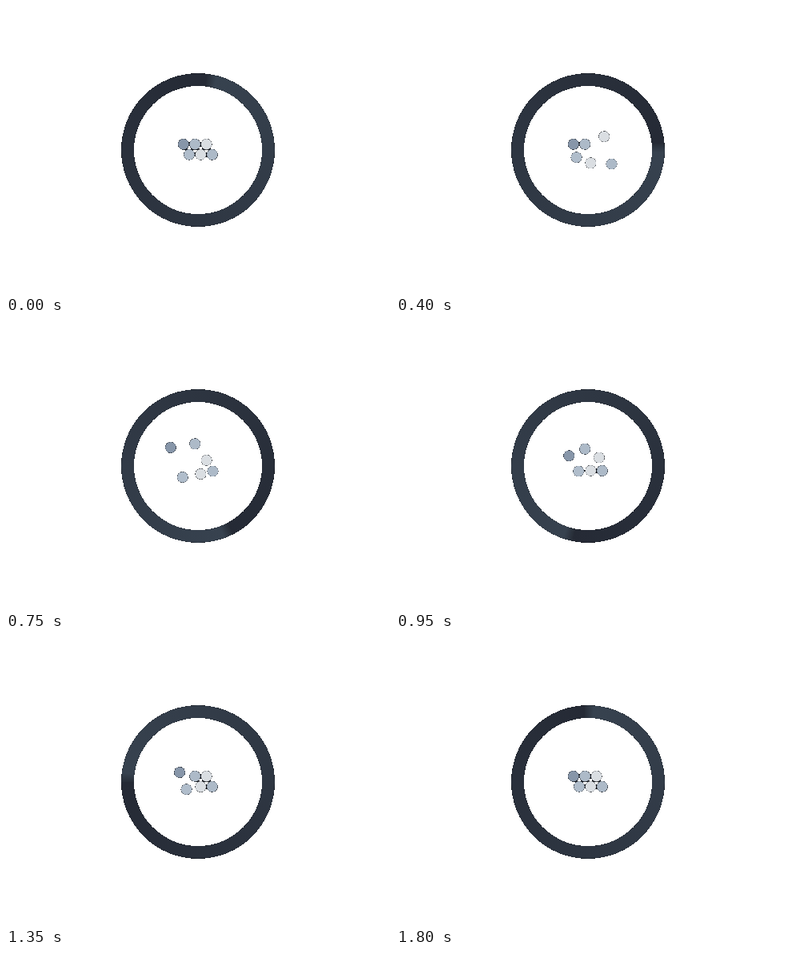
These frames come from a looping animation (480 by 360 pixels, 1.85 s). An HTML page with a canvas:

```html
<!DOCTYPE html>
<html lang="en">
<head>
<meta charset="utf-8">
<title>Loader</title>
<style>
  html, body { margin: 0; width: 100%; height: 100%; overflow: hidden; background: #fff; }
  canvas { display: block; width: 480px; height: 360px; }
</style>
</head>
<body>
<canvas id="stage" width="480" height="360"></canvas>
<script>
const ctx = document.getElementById('stage').getContext('2d', { willReadFrequently: true });
const LOOP = 1850, STEP = 50, DELAY = 100, TAU = Math.PI * 2;
const CENTER = { x: 240, y: 180 };
const PITCH = 14.4;

// Clockwise from the top right; col and row also give the direction of the hop.
const dots = [
  { col: 1, row: -1, reach: 11.6, color: '#dadee2' },
  { col: 1, row: 1, reach: 11.8, color: '#adbac8' },
  { col: 0, row: 1, reach: 13, color: '#dadee2' },
  { col: -1, row: 1, reach: 12.2, color: '#b0bdcb' },
  { col: -1, row: -1, reach: 17, color: '#8796a9' },
  { col: 0, row: -1, reach: 21, color: '#adbac8' }
];

const clamp = u => Math.min(1, Math.max(0, u));
const ease = u => (1 - Math.cos(Math.PI * clamp(u))) / 2;

// One quick hop out and slow return, then a smaller hop.
function hop(t) {
  const first = ease(t / 280) - ease((t - 280) / 440);
  const second = Math.sin(Math.PI * clamp((t - 840) / 320)) ** 2;
  return first + 0.36 * second;
}

function place(dot, i, t) {
  const far = dot.reach * hop(t - i * DELAY);
  return {
    x: CENTER.x + dot.col * (PITCH + far) + dot.row * PITCH / 4 - 0.2,
    y: CENTER.y - 0.7 + dot.row * (6.5 + far),
    color: dot.color
  };
}

function disc(x, y, r, color) {
  ctx.beginPath();
  ctx.arc(x, y, r, 0, TAU);
  ctx.fillStyle = color;
  ctx.fill();
}

function drawRing(t) {
  const { x, y } = CENTER;
  const seam = (7 / 360 + t / LOOP) * TAU - TAU / 4;
  const shade = ctx.createConicGradient(seam, x, y);
  shade.addColorStop(0, '#272d37');
  shade.addColorStop(0.02, '#37424f');
  shade.addColorStop(1, '#252a35');
  ctx.beginPath();
  ctx.arc(x, y, 88, 0, TAU);
  ctx.lineWidth = 16;
  ctx.strokeStyle = shade;
  ctx.stroke();
}

// Keep only well covered pixels, darkened by what they lack: crisp dark rims,
// and dark joins where the halos of two dots overlap.
function hardenEdges() {
  const image = ctx.getImageData(140, 80, 200, 200);
  const px = image.data;
  for (let i = 0; i < px.length; i += 4) {
    const cover = px[i + 3] / 255;
    for (let c = 0; c < 3; c++) px[i + c] *= cover;
    px[i + 3] = cover < 0.5 ? 0 : 255;
  }
  ctx.putImageData(image, 140, 80);
}

function draw(t) {
  ctx.clearRect(0, 0, 480, 360);
  drawRing(t);
  const placed = dots.map((dot, i) => place(dot, i, t));
  placed.forEach(p => disc(p.x, p.y, 8.2, 'rgba(20, 26, 36, 0.35)'));
  placed.forEach(p => disc(p.x, p.y, 6.8, p.color));
  hardenEdges();
}

const start = performance.now();
let shown = -1;
function tick() {
  const t = (performance.now() - start) % LOOP;
  const step = Math.floor(t / STEP);
  if (step !== shown) draw(step * STEP);
  shown = step;
  requestAnimationFrame(tick);
}
tick();
</script>
</body>
</html>
```
